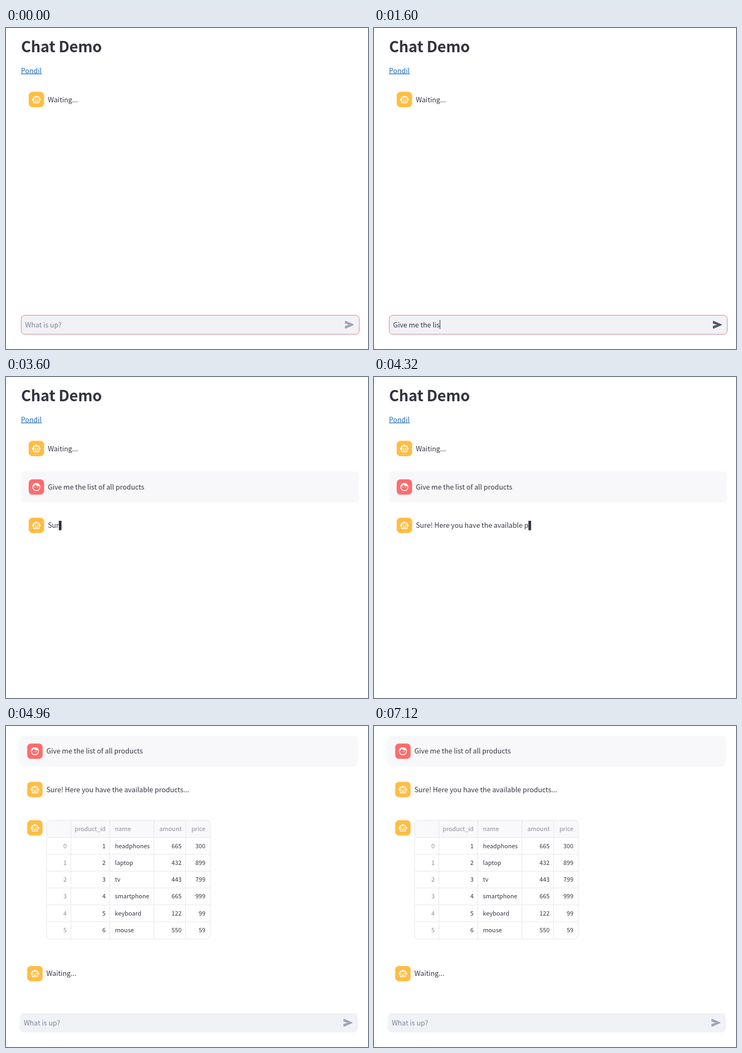
These frames come from a looping animation (672 px wide and 596 px high, 7.2 s). An HTML page:

```html
<!DOCTYPE html>
<html lang="en">
<head>
<meta charset="utf-8">
<title>Chat Demo</title>
<style>
html, body { margin: 0; width: 100%; height: 100%; overflow: hidden; background: #fff; }
svg { display: block; }
text { font: 12.79px "Noto Sans CJK JP", "Noto Sans CJK SC", "Noto Sans CJK KR", "Noto Sans", sans-serif; fill: #363844; white-space: pre; }
.title { font-size: 28px; font-weight: 700; letter-spacing: -.14px; fill: #31333f; }
.link { fill: #1f6bb5; text-decoration: underline; }
.hint { fill: #808495; }
.cell { font-size: 11.15px; }
.muted { font-size: 11.15px; fill: #8b8d98; }
.right { text-anchor: end; }
</style>
</head>
<body>
<svg id="stage" width="672" height="596" viewBox="0 0 672 596"></svg>
<script>
const LOOP = 7200, SUBMIT = 3360, REPLY = 3534, TABLE = 4600, SCROLL = 4750, INPUT_BACK = 4765;
const PROMPT = 'Give me the list of all products';
const ANSWER = 'Sure! Here you have the available products...';
const PRODUCTS = [
  ['headphones', 665, 300], ['laptop', 432, 899], ['tv', 443, 799],
  ['smartphone', 665, 999], ['keyboard', 122, 99], ['mouse', 550, 59]
];
const ROBOT = 'M20 9V7c0-1.1-.9-2-2-2h-3c0-1.66-1.34-3-3-3S9 3.34 9 5H6c-1.1 0-2 .9-2 2v2c-1.66 0-3 1.34-3 3s1.34 3 3 3v4c0 1.1.9 2 2 2h12c1.1 0 2-.9 2-2v-4c1.66 0 3-1.34 3-3s-1.34-3-3-3zm-2 10H6V7h12v12zm-9-6c-.83 0-1.5-.67-1.5-1.5S8.17 10 9 10s1.5.67 1.5 1.5S9.83 13 9 13zm7.5-1.5c0 .83-.67 1.5-1.5 1.5s-1.5-.67-1.5-1.5.67-1.5 1.5-1.5 1.5.67 1.5 1.5zM8 15h8v2H8v-2z';
const FACE = 'M9 11.75a1.25 1.25 0 100 2.5a1.25 1.25 0 100-2.5zm6 0a1.25 1.25 0 100 2.5a1.25 1.25 0 100-2.5zM12 2C6.48 2 2 6.48 2 12s4.48 10 10 10 10-4.48 10-10S17.52 2 12 2zm0 18c-4.41 0-8-3.59-8-8 0-.29.02-.58.05-.86 2.36-1.05 4.23-2.98 5.21-5.37C11.07 8.33 14.05 10 17.42 10c.78 0 1.53-.09 2.25-.26.21.71.33 1.47.33 2.26 0 4.41-3.59 8-8 8z';
const SEND = 'M2 4.5q.2-1.2 1.4-.9l17.45 7.48q1.3.92 0 1.84l-17.45 7.48q-1.2.3-1.4-.9v-4.8L11 12 2 9.3z';

const stage = document.getElementById('stage');
const clamp = (v, lo, hi) => Math.min(hi, Math.max(lo, v));
const text = (x, y, s, cls = '') => `<text x="${x}" y="${y}" class="${cls}">${s}</text>`;
const rect = (x, y, w, h, fill, r = 0, more = '') =>
  `<rect x="${x}" y="${y}" width="${w}" height="${h}" rx="${r}" fill="${fill}" ${more}/>`;
const icon = (x, y, scale, d, fill) =>
  `<path transform="translate(${x} ${y}) scale(${scale})" d="${d}" fill="${fill}"/>`;
const avatar = (cy, fill, d) =>
  rect(42.1, cy - 14.3, 28.6, 28.6, fill, 7) + icon(47.5, cy - 8.9, .74, d, '#fff');
const bot = cy => avatar(cy, '#ffbd45', ROBOT);
const message = (cy, s, cls) => text(77.7, cy + 4.7, s, cls);

function table() {
  const left = 78.2, top = 332.5, width = 303.6, bottom = 553.2, rowH = 31.25, head = 364.5;
  let lines = '';
  for (const x of [123.2, 195.4, 277.4, 336.2]) lines += `M${x} ${top}V${bottom}`;
  for (let i = 0; i < 6; i++) lines += `M${left} ${head + i * rowH}h${width}`;
  const row = (cy, [index, id, name, amount, price], cls) => {
    const y = cy + 4.1;
    return text(115.5, y, index, 'muted right') + text(187.7, y, id, cls + ' right') +
      text(205, y, name, cls) + text(328.6, y, amount, cls + ' right') +
      text(372.8, y, price, cls + ' right');
  };
  return rect(left, top, width, 32, '#f9f9fb', 6) +
    `<path d="${lines}" stroke="#e6e7eb" fill="none"/>` +
    rect(left, top, width, bottom - top, 'none', 7, 'stroke="#e4e5ea"') +
    row(348.7, ['', 'product_id', 'name', 'amount', 'price'], 'muted') +
    PRODUCTS.map((p, i) => row(380 + i * rowH, [i, i + 1, ...p], 'cell')).join('');
}

function inputBox(typed, focused) {
  const border = focused ? 'stroke="#de7f86"' : '';
  return rect(0, 522, 680, 74, '#fff') + rect(28.2, 533.3, 627.6, 35.4, '#f0f2f6', 7, border) +
    text(35.6, 555.7, typed || 'What is up?', typed ? 'live' : 'hint') +
    icon(627.4, 540.7, .86, SEND, typed ? '#55566a' : '#a0a4b6');
}

function render(t) {
  const typed = PROMPT.slice(0, clamp(Math.floor((t - 295) / 87), 0, PROMPT.length));
  const said = ANSWER.slice(0, clamp(Math.floor((t - REPLY) / 22), 0, ANSWER.length));
  const streaming = t >= REPLY && said.length < ANSWER.length;
  const ease = 1 - (1 - clamp((t - SCROLL) / 180, 0, 1)) ** 3;

  let page = text(28, 45, 'Chat Demo', 'title') + text(27.8, 83.6, 'Pondil', 'link') +
    bot(132.8) + message(132.8, 'Waiting...');
  if (t >= SUBMIT)
    page += rect(28, 175.6, 627.8, 57.2, '#f8f8fa', 7) + avatar(204.2, '#ff6c6c', FACE) + message(204.2, PROMPT);
  if (t >= REPLY) page += bot(275.5) + message(275.5, said, streaming ? 'live' : '');
  if (t >= TABLE) page += bot(346.7) + table() + bot(617.2) + message(617.2, 'Waiting...');

  let box = '';
  if (t < SUBMIT) box = inputBox(typed, true);
  else if (t >= INPUT_BACK) box = inputBox('', false);

  // The scrollbar narrows the page once the table is in.
  stage.innerHTML = `<g transform="translate(${t >= TABLE ? -2.7 : 0} 0)">` +
    `<g transform="translate(0 ${-157.5 * ease})">${page}</g>${box}</g>`;

  const live = stage.querySelector('.live');
  if (live) {
    const end = +live.getAttribute('x') + live.getComputedTextLength();
    live.insertAdjacentHTML('afterend', streaming
      ? rect(end, 267, 5, 17.5, '#31333f')
      : rect(Math.round(end), 542, 1, 17, '#31333f'));
  }
}

const start = performance.now();
function frame() {
  render((performance.now() - start) % LOOP);
  requestAnimationFrame(frame);
}
frame();
</script>
</body>
</html>
```
